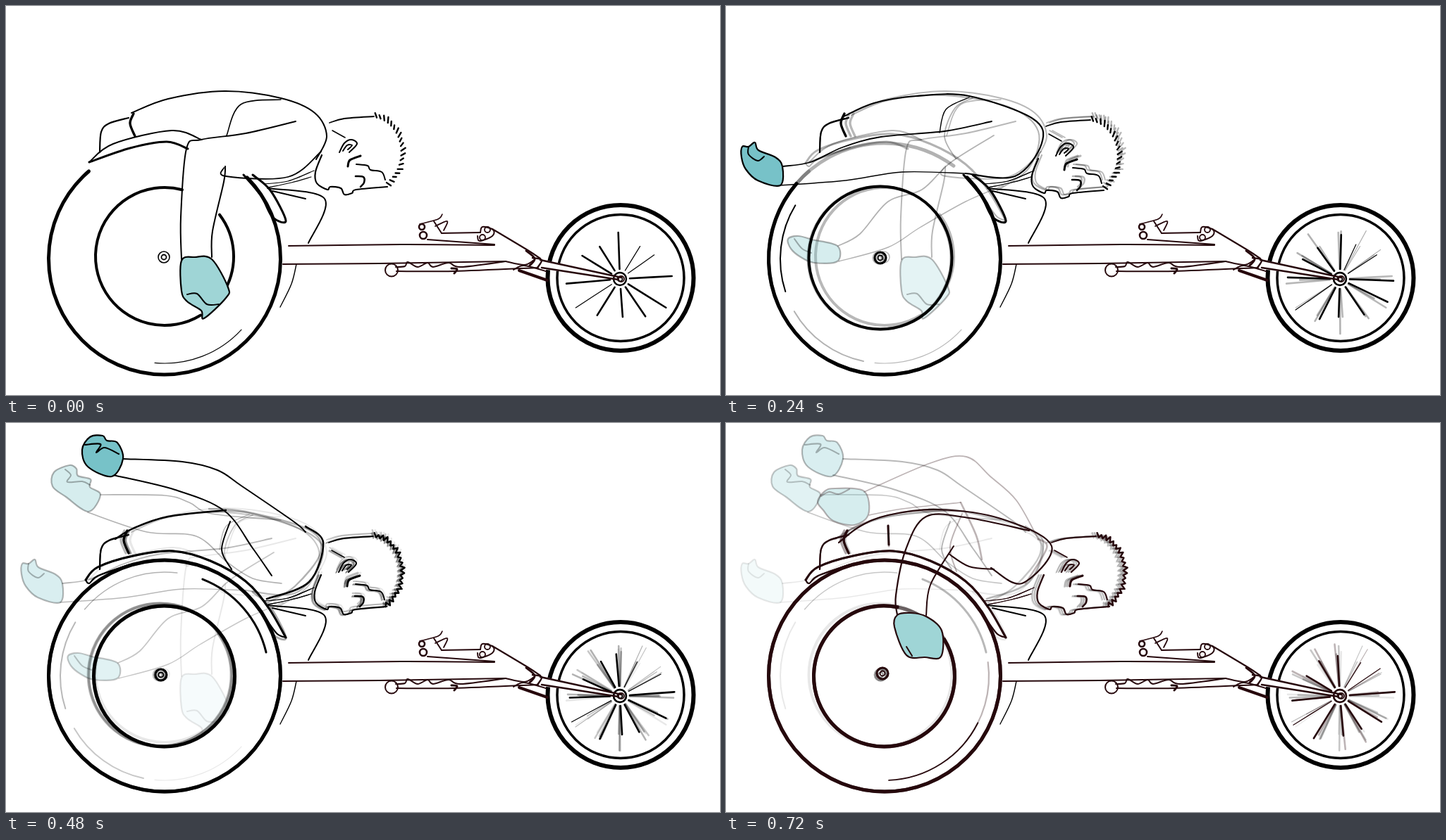
An HTML page with a canvas that plays this animation: 1013x553 px, repeating every 840 ms.

```html
<!DOCTYPE html>
<html lang="en">
<head>
<meta charset="utf-8">
<title>Wheelchair racer</title>
<style>
html, body { margin: 0; width: 100%; height: 100%; overflow: hidden; background: #fff; }
canvas { display: block; }
</style>
</head>
<body>
<canvas id="stage" width="1013" height="553"></canvas>
<script>
const ctx = document.getElementById('stage').getContext('2d');
const STEP = 120, TAU = Math.PI * 2;
const BLACK = '#000', MAROON = '#26080c', TEAL = '#77c2c8', PALE = '#9fd5d6';

// Smooth curve through all given points.
function trace(p, closed) {
  const n = p.length / 2;
  const at = i => {
    const k = 2 * (closed ? (i + n) % n : Math.max(0, Math.min(n - 1, i)));
    return [p[k], p[k + 1]];
  };
  ctx.beginPath();
  ctx.moveTo(...at(0));
  for (let i = 0; i < n - !closed; i++) {
    const [a, b, c, d] = [at(i - 1), at(i), at(i + 1), at(i + 2)];
    ctx.bezierCurveTo(
      b[0] + (c[0] - a[0]) / 6, b[1] + (c[1] - a[1]) / 6,
      c[0] - (d[0] - b[0]) / 6, c[1] - (d[1] - b[1]) / 6, c[0], c[1]);
  }
}

function pen(width, ...points) {
  ctx.lineWidth = width;
  trace(points);
  ctx.stroke();
}

function glove(color, ...points) {
  trace(points, true);
  ctx.fillStyle = color;
  ctx.fill();
  ctx.lineWidth = 2.2;
  ctx.stroke();
}

function arc(x, y, r, width, from = 0, to = TAU) {
  ctx.lineWidth = width;
  ctx.beginPath();
  ctx.arc(x, y, r, from, to);
  ctx.stroke();
}

function hub(x, y, r, width) {
  arc(x, y, r, width);
  arc(x, y, 3.5, 1.8);
}

const tire = (from, to) => arc(225, 359.5, 164.5, 5, from, to);
const shine = (from, to, width) => arc(225, 360, 148, width, from, to);
const ring = (from, to) => arc(224.5, 360, 100, 5, from, to);

// Front spokes: even spread, lengths vary a little with the seed.
function spokes(seed) {
  for (let i = 0; i < 12; i++) {
    const a = (i * 30 - 92 + 4 * Math.sin(seed + i * 2)) * TAU / 360;
    const far = 66 + 12 * Math.sin(seed * 3 + i * 5);
    const thin = i === 1 || i === 2 || i === 8;
    const c = Math.cos(a), s = Math.sin(a);
    pen(thin ? 1.2 : 2.6, 871 + 14 * c, 388 + 14 * s, 871 + far * c, 388 + far * s);
  }
  hub(871, 388, 9, 2.4);
}

function head(dx, dy, cropped) {
  ctx.save();
  ctx.translate(dx, dy);
  pen(2.2, 448, 212, 439, 236, 441, 252, 456, 261, 460, 257, 475, 259, 480, 268, 491, 266, 497, 261, 541, 257);
  pen(2, 473, 208, 480, 195, 490, 190, 498, 196, 487, 208);
  pen(2, 478, 206, 484, 198, 491, 198, 485, 204);
  pen(3, 485, 228, 488, 219, 503, 213);
  pen(2, 497, 225, 513, 227, 517, 233, 533, 236, 538, 247);
  pen(2.6, 496, 242, 507, 243, 508, 251, 503, 257);
  pen(1.8, 459, 166, 480, 160, 522, 157);
  pen(1.6, 463, 177, 481, 187);
  ctx.lineWidth = 2.4;
  ctx.beginPath();
  for (let i = 0; i <= 38; i++) {
    const a = -1.45 + i * 0.067;
    const k = i % 2 ? 0.95 : 1.06 + 0.03 * Math.sin(i * 2.3);
    const x = 518 + 45 * k * Math.cos(a), y = 208 + 53 * k * Math.sin(a);
    i && (cropped || i % 2) ? ctx.lineTo(x, y) : ctx.moveTo(x, y);
  }
  ctx.stroke();
  ctx.restore();
}

function seat(waist) {
  pen(2.2, 133, 208, 135, 179, 146, 167, 174, 159);
  pen(3.4, waist, 153, waist - 5, 167, waist + 2, 185);
  pen(1.2, 366, 253, 400, 249, 437, 234);
  pen(1.2, 372, 258, 405, 251, 433, 243);
}

function fender() {
  pen(3, 113, 223, 130, 205, 180, 189, 237, 182, 290, 196, 340, 225, 372, 262, 397, 305);
  pen(2, 113, 223, 118, 228, 131, 217, 176, 201);
  pen(2, 372, 283, 385, 300, 397, 305);
}

const flap = () => pen(3, 337, 240, 362, 270, 378, 300, 397, 305, 375, 262, 350, 240);

function hang() {
  tire(-0.78, 4);
  arc(225, 356, 98, 4, -0.65, 0.5);
  arc(225, 356, 98, 4, 1.02, 4.97);
  hub(224, 357, 8, 1.6);
  shine(0.743, 1.665, 1.2);
  seat(181);
  flap();
  pen(2, 118, 222, 152, 196, 235, 177, 277, 190);
  pen(3, 118, 222, 176, 202, 228, 193, 258, 203);
  pen(2, 178, 152, 230, 132, 310, 121, 390, 131, 438, 152, 455, 185, 440, 218);
  pen(1.6, 313, 184, 333, 140, 390, 133);
  head(0, 0);
  pen(2, 411, 164, 340, 181, 277, 190, 256, 203, 248, 300, 249, 360);
  pen(2, 311, 228, 309, 250, 293, 320, 292, 357);
  pen(1.8, 309, 230, 312, 242, 400, 243, 447, 207);
  glove(PALE, 249, 362, 268, 357, 292, 360, 315, 400, 312, 415, 281, 444, 277, 433, 257, 420, 249, 405);
  pen(2, 257, 410, 271, 409, 285, 424, 302, 424);
}

function swing() {
  tire(-0.5, 5.35);
  arc(218, 358, 101.5, 4, -0.62, 5.18);
  hub(217, 358, 8, 3);
  shine(1.775, 2.617, 2);
  seat(175);
  fender();
  pen(2, 178, 155, 230, 134, 310, 127, 400, 143, 443, 178, 430, 230, 385, 262);
  pen(1.8, 326, 217, 310, 185, 325, 145, 350, 131);
  head(-4, 0);
  pen(1.8, 380, 184, 318, 223, 278, 261, 230, 278, 190, 324, 159, 341);
  pen(1.4, 394, 255, 340, 278, 275, 315, 230, 343, 160, 363);
  glove(TEAL, 158, 341, 122, 332, 103, 327, 88, 331, 92, 345, 106, 357, 125, 365, 158, 363);
  pen(2, 97, 331, 108, 345, 121, 351);
}

function trail() {
  tire(-0.78, 3.85);
  arc(219, 358, 101.5, 4);
  hub(219, 358, 8, 3);
  shine(2.826, 3.686, 2);
  seat(168);
  flap();
  pen(2.2, 167, 157, 210, 138, 270, 128, 345, 128, 435, 160, 448, 195, 410, 242, 340, 238);
  pen(1.4, 303, 180, 312, 147, 345, 130);
  head(-5, 5);
  pen(1.8, 377, 164, 310, 178, 220, 186, 165, 201, 120, 222, 80, 228);
  pen(1.4, 77, 255, 170, 248, 250, 236, 340, 238);
  glove(TEAL, 80, 228, 70, 215, 46, 205, 41, 194, 32, 200, 23, 200, 22, 215, 28, 232, 45, 248, 77, 255);
  pen(2, 32, 200, 32, 211, 45, 220, 54, 214);
}

function lift() {
  tire();
  ring();
  hub(219, 358, 8, 3);
  shine(3.84, 4.833, 1.5);
  seat(174);
  fender();
  pen(2.4, 288, 122, 340, 126, 430, 152, 446, 185, 410, 232, 372, 255);
  head(-4, 4, true);
  pen(1.7, 134, 102, 225, 103, 260, 113, 292, 129, 390, 138);
  pen(1.7, 116, 127, 200, 155, 270, 161, 314, 198, 350, 221, 391, 228);
  glove(TEAL, 134, 102, 119, 91, 120, 80, 102, 75, 100, 65, 90, 60, 68, 70, 66, 90, 85, 105, 117, 126);
  pen(2, 84, 66, 92, 74, 87, 84, 108, 83, 119, 88);
}

function peak() {
  tire();
  ring();
  hub(220, 358, 8, 3);
  shine(5.085, 6.051, 3);
  seat(172);
  fender();
  pen(2.4, 155, 165, 180, 150, 230, 133, 312, 124);
  pen(2.6, 425, 147, 450, 170, 430, 226, 370, 250);
  pen(2, 318, 140, 306, 180, 320, 208);
  head(-1, 4, true);
  pen(2, 166, 51, 250, 55, 300, 67, 335, 90, 408, 140, 425, 155);
  pen(2, 152, 74, 240, 95, 310, 125, 350, 178, 377, 217);
  glove(TEAL, 166, 51, 158, 28, 143, 25, 137, 18, 119, 20, 108, 38, 116, 62, 150, 76);
  pen(2.2, 112, 31, 134, 30, 128, 42, 140, 35, 160, 44);
}

function fold() {
  tire();
  ring();
  hub(222, 356, 8, 3);
  shine(-0.135, 0.69, 2.2);
  seat(168);
  fender();
  pen(3, 230, 146, 231, 175);
  pen(2.2, 160, 170, 180, 149, 250, 127, 337, 125);
  pen(2.6, 443, 165, 455, 178, 425, 228);
  pen(2, 335, 129, 318, 175, 327, 211);
  head(2, 4, true);
  pen(1.8, 196, 98, 290, 57, 341, 48, 375, 76, 412, 110, 443, 165);
  pen(1.5, 203, 131, 250, 122, 333, 113);
  pen(2.6, 333, 113, 355, 160, 363, 194);
  glove(TEAL, 196, 97, 155, 93, 140, 97, 130, 112, 138, 124, 152, 139, 182, 145, 202, 130);
  pen(2.2, 135, 104, 146, 98, 160, 101, 175, 94);
}

function drop() {
  tire();
  ring(-0.55, 4.9);
  hub(222, 356, 8, 3);
  shine(0.464, 1.53, 1.8);
  seat(172);
  fender();
  pen(3, 230, 146, 231, 173);
  pen(2.2, 160, 170, 190, 147, 230, 131, 300, 123, 390, 136, 462, 175, 420, 228, 376, 206);
  head(3, 4, true);
  pen(2.2, 430, 153, 345, 135, 284, 133, 255, 180, 241, 245, 243, 273);
  pen(2, 323, 175, 290, 230, 284, 273);
  pen(2, 316, 186, 345, 204, 380, 208);
  glove(PALE, 243, 273, 262, 270, 284, 275, 306, 295, 305, 332, 282, 333, 256, 330, 239, 290);
  pen(2, 264, 331, 256, 318);
}

const poses = [hang, swing, trail, lift, peak, fold, drop];
const fade = [1, 0.3, 0.28, 0.22, 0.09];

function frontWheel() {
  ctx.strokeStyle = BLACK;
  arc(872, 386.5, 103.5, 6);
  arc(872, 386.5, 90, 3.5);
}

function chassis() {
  pen(2, 371, 259, 452, 274, 429, 337);
  pen(2, 378, 263, 425, 274);
  pen(1.4, 412, 367, 405, 395, 389, 428);
  ctx.strokeStyle = MAROON;
  pen(2, 401, 341, 560, 339, 693, 340);
  pen(2, 393, 367, 530, 366, 709, 363);
  pen(2, 553, 371, 566, 370, 570, 364, 584, 371, 598, 365, 606, 371, 628, 365, 645, 371, 709, 363);
  pen(2, 554, 377, 635, 377, 755, 372);
  pen(3, 632, 373, 640, 374, 636, 380);
  arc(547, 375.5, 9, 2);
}

function brake() {
  pen(2, 618, 323, 673, 322);
  pen(2, 598, 332, 693, 339);
  pen(1.6, 587, 310, 613, 303, 619, 296);
  pen(2, 607, 306, 618, 323);
  pen(1.8, 609, 313, 626, 306, 621, 319);
  arc(590, 314, 4, 2.6);
  arc(592, 326, 5, 2.6);
  pen(2, 673, 322, 676, 314, 691, 318, 690, 327, 672, 334, 669, 327);
  arc(683, 318, 4, 1.8);
  arc(676, 329, 4, 1.8);
}

function fork() {
  ctx.fillStyle = '#fff';
  ctx.beginPath();
  ctx.moveTo(755, 359);
  ctx.lineTo(873, 386);
  ctx.lineTo(757, 374);
  ctx.fill();
  pen(2.2, 690, 317, 740, 347, 758, 359);
  pen(3, 738, 348, 750, 359, 743, 369);
  pen(2.4, 747, 358, 760, 361, 754, 372);
  pen(2, 709, 363, 735, 368, 748, 362);
  pen(2, 720, 375, 735, 369, 766, 377);
  pen(4, 728, 376, 768, 390);
  pen(2.4, 758, 361, 873, 386);
  pen(2.4, 760, 372, 869, 389);
  arc(873, 388, 4, 1.8);
}

function render() {
  const now = Math.floor(performance.now() / STEP) % poses.length;
  ctx.fillStyle = '#fff';
  ctx.fillRect(0, 0, 1013, 553);
  ctx.lineCap = ctx.lineJoin = 'round';
  for (let age = Math.min(now, fade.length - 1); age >= 0; age--) {
    const i = now - age;
    ctx.globalAlpha = fade[age];
    ctx.strokeStyle = i > 4 ? MAROON : BLACK;
    spokes(i);
    poses[i]();
  }
  ctx.globalAlpha = 1;
  frontWheel();
  chassis();
  brake();
  fork();
  requestAnimationFrame(render);
}
render();
</script>
</body>
</html>
```
